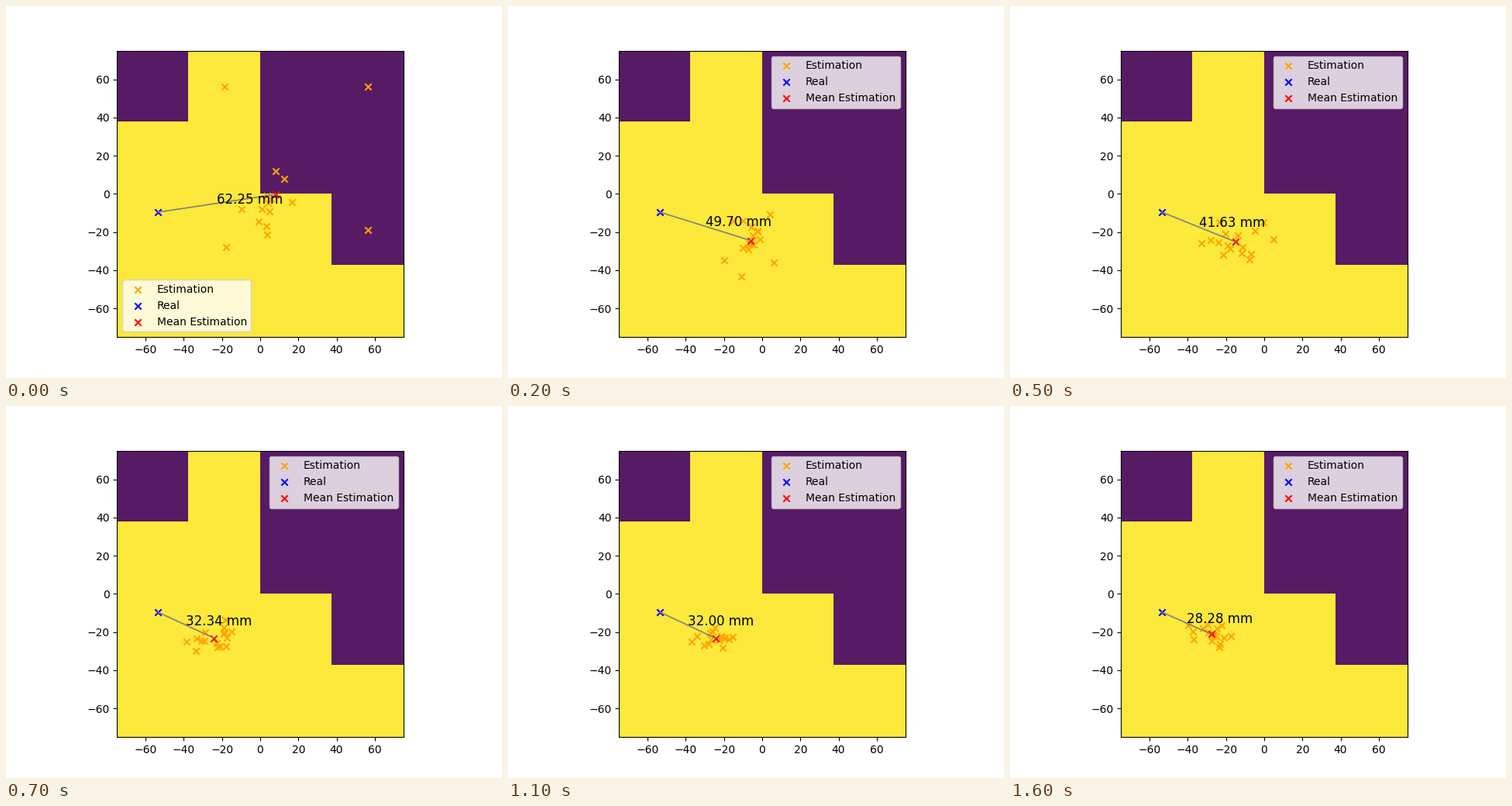
Recreate the animation shown at these times as a matplotlib script. Size 640 px wide and 480 px high, loop 1.7 s.

```python
import numpy as np
import matplotlib.pyplot as plt
from matplotlib.animation import FuncAnimation

FRAMES = 17
COUNT = 16
SIDE = 75  # half width of the board, mm
REAL = np.array([-53.5, -9.6])

# Key poses: how far the mean lies from REAL, its height, and the cloud's spread.
KEY_TIMES = [0, 2, 5, 7, 11, 13, 16]
DISTANCE = [62.25, 49.70, 41.63, 32.34, 32.00, 29.69, 28.28]
MEAN_Y = [-0.3, -24.4, -25.2, -23.2, -23.2, -23.8, -21.1]
SPREAD_X = [7, 6.3, 10, 7, 5.7, 5.5, 6]
SPREAD_Y = [8.5, 8.5, 5.6, 4.2, 2.6, 2.6, 3.4]

# Early guesses far from the rest, soon drawn into the cloud.
STRAYS = np.array([[-18.7, 56.2], [56.4, 56.2], [56.4, -18.9], [-17.9, -27.8]])


def key_value(values, frame):
    return np.interp(frame, KEY_TIMES, values)


def mean_at(frame):
    y = key_value(MEAN_Y, frame)
    dx = np.sqrt(key_value(DISTANCE, frame) ** 2 - (y - REAL[1]) ** 2)
    return np.array([REAL[0] + dx, y])


def cloud_at(frame):
    """Resampled guesses whose average is exactly the mean estimation."""
    mean = mean_at(frame)
    noise = np.random.default_rng(frame).normal(size=(COUNT, 2))
    noise = (noise - noise.mean(axis=0)) / noise.std(axis=0)
    spread = key_value(SPREAD_X, frame), key_value(SPREAD_Y, frame)
    pts = mean + noise * spread

    n = len(STRAYS)
    pull = max(0, 1 - frame / 2)
    pts[:n] += pull * (STRAYS - pts[:n])
    pts[n:] += (mean - pts.mean(axis=0)) * COUNT / (COUNT - n)
    return pts


fig, ax = plt.subplots(figsize=(6.4, 4.8), dpi=100)
board = [[0, 1, 0, 0],
         [1, 1, 0, 0],
         [1, 1, 1, 0],
         [1, 1, 1, 1]]
ax.imshow(board, extent=(-SIDE, SIDE, -SIDE, SIDE), cmap="viridis",
          alpha=0.9, interpolation="nearest")

cloud = ax.scatter(*cloud_at(0).T, marker="x", color="orange", label="Estimation")
ax.scatter(*REAL, marker="x", color="blue", label="Real")
mean_mark = ax.scatter(*mean_at(0), marker="x", color="red", label="Mean Estimation")
link, = ax.plot([], [], color="gray", lw=1.2)
label = ax.text(0, 0, "", fontsize=12)
ax.legend(loc="best")  # moves to the upper right once no stray lies there
ax.set_xlim(-SIDE, SIDE)
ax.set_ylim(-SIDE, SIDE)


def draw(frame):
    mean = mean_at(frame)
    cloud.set_offsets(cloud_at(frame))
    mean_mark.set_offsets([mean])
    link.set_data(*zip(REAL, mean))
    label.set_position((REAL + mean) / 2)
    label.set_text(f"{np.hypot(*(mean - REAL)):.2f} mm")
    return cloud, mean_mark, link, label


anim = FuncAnimation(fig, draw, frames=FRAMES, interval=100,
                     repeat=True, repeat_delay=0, blit=False)
plt.show()
```
